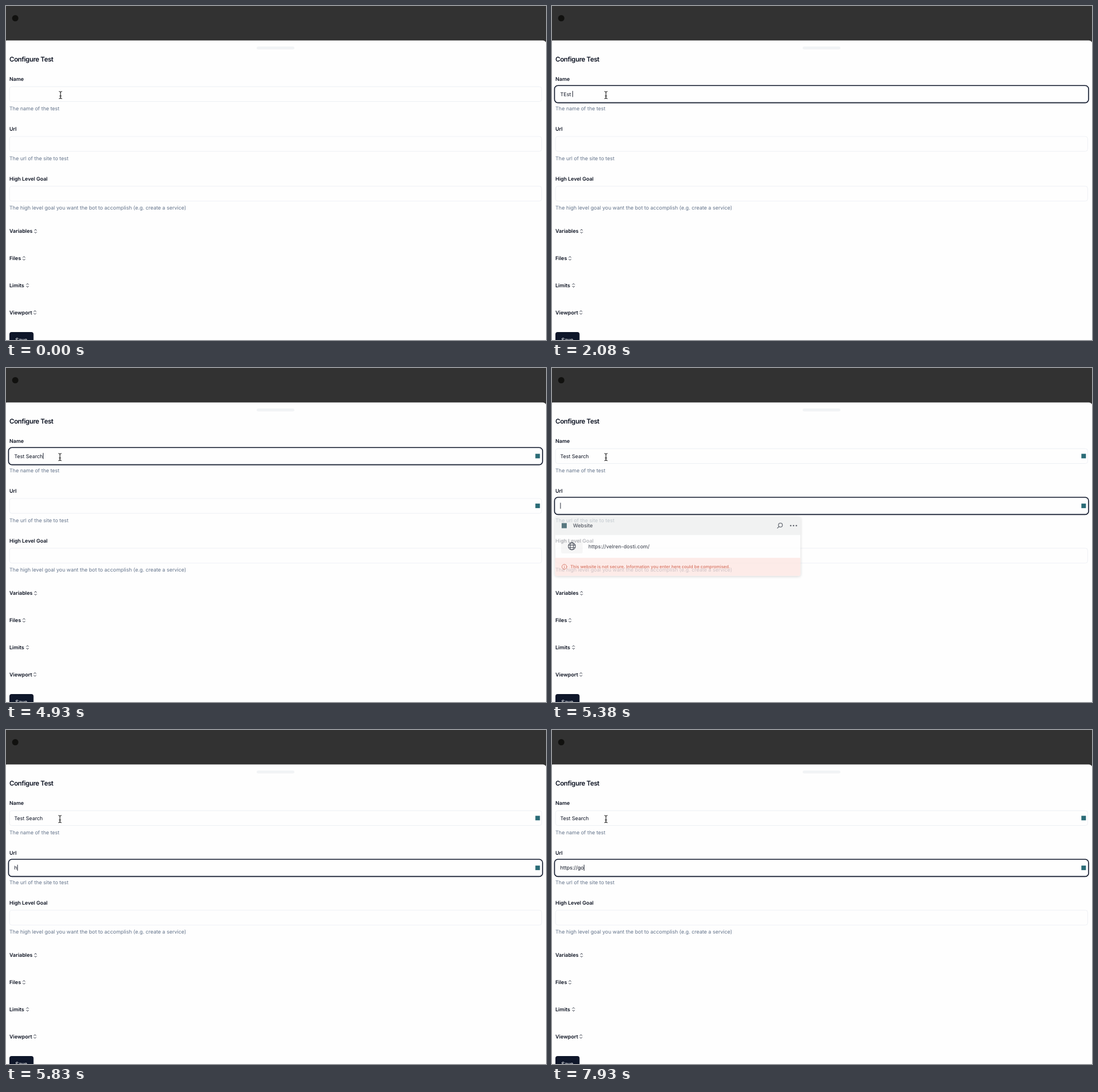
These frames come from a looping animation (951x589 px, 8000 ms). An HTML page:

```html
<!DOCTYPE html>
<html lang="en">
<head>
<meta charset="utf-8">
<title>Configure Test</title>
<style>
  html, body { margin: 0; width: 100%; height: 100%; overflow: hidden; background: #fefefe; }
  svg { display: block; width: 951px; height: 589px; }
  text { font: 9px Inter, "Open Sans", sans-serif; fill: #0b1120; text-rendering: geometricPrecision; }
  .title { font-size: 11.6px; font-weight: 600; letter-spacing: -.034em; }
  .label { font-size: 8.95px; font-weight: 600; }
  .section { font-size: 9.05px; font-weight: 600; }
  .hint { fill: #64748b; }
  .medium { font-weight: 500; }
  .warning { font-size: 7.57px; font-weight: 500; fill: #c63a22; }
  .line { fill: none; stroke: #111827; stroke-linecap: round; stroke-linejoin: round; }
  .field { fill: #fefefe; stroke: #eaedf1; stroke-width: .8; }
  .ring { fill: none; stroke: #0f172a; stroke-width: 1.6; }
  #popup { filter: drop-shadow(0 1px 2.5px rgba(0, 0, 0, .24)); }
</style>
</head>
<body>
<svg id="stage" viewBox="0 0 951 589">
  <rect width="951" height="70" fill="#323232"/>
  <circle cx="16.3" cy="21.5" r="5.5" fill="#11110f"/>
  <rect x="-4" y="60.7" width="955.5" height="560" rx="6" fill="#fefefe"/>
  <rect x="441.5" y="71.5" width="66.3" height="5" rx="2.5" fill="#f1f3f5"/>
  <text class="title" x="6" y="97.5">Configure Test</text>
  <g id="form"></g>
  <rect x="6" y="575" width="42.5" height="26.6" rx="4" fill="#0f172a"/>
  <text class="medium" x="16.4" y="591.7" style="fill:#f8fafc">Save</text>

  <g id="popup">
    <rect x="5.5" y="262.5" width="432" height="104" rx="3" fill="#fff"/>
    <path d="M5.5 294.5V265.5a3 3 0 0 1 3-3h426a3 3 0 0 1 3 3v29z" fill="#eceeed"/>
    <path d="M5.5 334.7h432v28.8a3 3 0 0 1-3 3h-426a3 3 0 0 1-3-3z" fill="#fde4df"/>
    <rect x="17" y="273.5" width="9" height="9" fill="#12404b"/>
    <text class="medium" x="37" y="281.2">Website</text>
    <g class="line" stroke-width="1.1">
      <circle cx="402.3" cy="277" r="3.5"/>
      <path d="M399.7 279.7L397 282.4"/>
    </g>
    <g fill="#111827">
      <circle cx="420.4" cy="278" r="1.25"/>
      <circle cx="425.4" cy="278" r="1.25"/>
      <circle cx="430.4" cy="278" r="1.25"/>
    </g>
    <rect x="16" y="302" width="38" height="25" rx="3" fill="#f3f3f3"/>
    <g class="line" stroke-width="1.2" transform="translate(35 314.4)">
      <circle r="6.2"/>
      <ellipse rx="2.8" ry="6.2"/>
      <path d="M-5.8-2.1H5.8M-5.8 2.1H5.8"/>
    </g>
    <text class="medium" x="64" y="317.6">https://velren-dosti.com/</text>
    <g class="line" stroke-width=".9" transform="translate(21.8 350.5)" style="stroke:#c63a22">
      <circle r="4.3"/>
      <path d="M0-.3V2.1M0-2.1V-2"/>
    </g>
    <text class="warning" x="32.2" y="353.2">This website is not secure. Information you enter here could be compromised.</text>
  </g>

  <rect id="caret" width=".9" height="10.6" fill="#0b1120"/>
  <g id="pointer" fill="none" stroke-linecap="round">
    <path d="M-2.4-6.3Q-.4-6.3 0-5Q.4-6.3 2.4-6.3M0-5V5M-2.4 6.3Q-.4 6.3 0 5Q.4 6.3 2.4 6.3M-1.4 1.8H1.4" stroke="#fff" stroke-width="2.2"/>
    <path d="M-2.4-6.3Q-.4-6.3 0-5Q.4-6.3 2.4-6.3M0-5V5M-2.4 6.3Q-.4 6.3 0 5Q.4 6.3 2.4 6.3M-1.4 1.8H1.4" stroke="#111" stroke-width="1.1"/>
  </g>
</svg>
<script>
const LOOP = 8000;
const TEXT_X = 14.5;
const $ = id => document.getElementById(id);

function add(tag, attrs, text = '') {
  const el = document.createElementNS('http://www.w3.org/2000/svg', tag);
  for (const key in attrs) el.setAttribute(key, attrs[key]);
  el.textContent = text;
  $('form').append(el);
  return el;
}

function addField(top, label, hint) {
  add('text', { class: 'label', x: 6, y: top - 9.6 }, label);
  add('rect', { class: 'field', x: 6.2, y: top + .3, width: 937.2, height: 26.2, rx: 4 });
  const ring = add('rect', { class: 'ring', x: 4.4, y: top - 1.8, width: 940.6, height: 30.4, rx: 6 });
  const badge = add('rect', { x: 932.3, y: top + 9.3, width: 8, height: 8, fill: '#2a6b76' });
  const value = add('text', { x: TEXT_X, y: top + 16.6 });
  add('text', { class: 'hint', x: 6, y: top + 41.8 }, hint);
  return { top, ring, badge, value };
}

const fields = [
  addField(142, 'Name', 'The name of the test'),
  addField(229.8, 'Url', 'The url of the site to test'),
  addField(317.5, 'High Level Goal',
    'The high level goal you want the bot to accomplish (e.g. create a service)')
];

[['Variables', 52], ['Files', 31.6], ['Limits', 37.9], ['Viewport', 51]].forEach(([name, x], i) => {
  const y = 397.2 + i * 47.75;
  add('text', { class: 'section', x: 6, y: y + 3.2 }, name);
  add('path', {
    class: 'line', 'stroke-width': .9, transform: `translate(${x} ${y})`,
    d: 'M-1.8-1.5L0-3.3L1.8-1.5M-1.8 1.5L0 3.3L1.8 1.5'
  });
});

// [time, value] steps
const nameSteps = [
  [0, ''], [1790, 'T'], [1940, 'TEs'], [2080, 'TEst '],
  [2530, 'TEst'], [2680, 'TE'], [2830, 'T'], [2980, 'Te'], [3130, 'Test'], [3430, 'Test '],
  [4030, 'Test S'], [4180, 'Test Se'], [4330, 'Test Sea'], [4780, 'Test Sear'], [4930, 'Test Search']
];
const urlSteps = [
  [0, ''], [5830, 'h'], [5980, 'ht'], [6130, 'http'], [6280, 'https'], [6580, 'https:'],
  [6880, 'https:/'], [7030, 'https://'], [7930, 'https://go']
];
const focusSteps = [[0, -1], [150, 0], [5230, 1]];
const caretSteps = [[0, 0], [150, 1], [740, 0], [1190, 1], [7480, 0], [7930, 1]];
const popupSteps = [[0, 0], [5380, .7], [5530, 1], [5830, 0]];
const badgeSteps = [[0, 0], [4180, 1]];
const pointerSteps = [[0, 96], [300, 95]];

function at(steps, t) {
  let value = steps[0][1];
  for (const [time, next] of steps) if (t >= time) value = next;
  return value;
}

function setText(el, text) {
  const shown = text.replace(/ /g, '\u00a0');
  if (el.textContent !== shown) el.textContent = shown;
}

function draw(t) {
  const focus = at(focusSteps, t);
  setText(fields[0].value, at(nameSteps, t));
  setText(fields[1].value, at(urlSteps, t));
  fields.forEach((field, i) => {
    field.ring.setAttribute('opacity', i === focus ? 1 : 0);
    field.badge.setAttribute('opacity', i < 2 ? at(badgeSteps, t) : 0);
  });

  const active = fields[Math.max(focus, 0)];
  const width = active.value.textContent ? active.value.getComputedTextLength() : 0;
  $('caret').setAttribute('x', TEXT_X + width);
  $('caret').setAttribute('y', active.top + 7.8);
  $('caret').setAttribute('opacity', at(caretSteps, t));
  $('popup').setAttribute('opacity', at(popupSteps, t));
  $('pointer').setAttribute('transform', `translate(${at(pointerSteps, t)} 157)`);
}

const start = performance.now();
function tick() {
  draw((performance.now() - start) % LOOP);
  requestAnimationFrame(tick);
}
tick();
</script>
</body>
</html>
```
